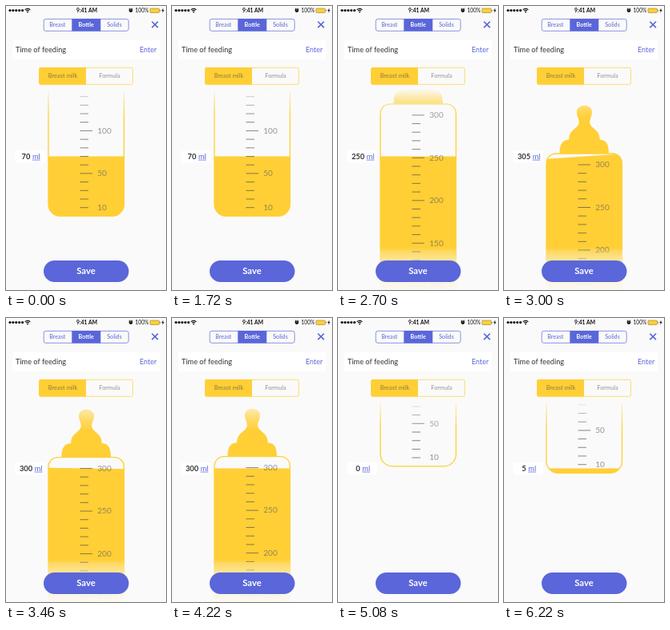
These frames come from a looping animation (200x356 px, 6.26 s). An HTML page with a canvas:

```html
<!DOCTYPE html>
<html lang="en">
<head>
<meta charset="utf-8">
<title>Feeding tracker</title>
<style>
html, body { margin: 0; width: 100%; height: 100%; overflow: hidden; background: #fafafa; }
canvas { display: block; width: 200px; height: 356px; }
</style>
</head>
<body>
<canvas id="stage"></canvas>
<script>
const W = 200, H = 356, LOOP = 6260;
const BLUE = '#5a66d9', YELLOW = '#ffcf35', BG = '#fafafa', INK = '#333338';
const LEVEL = 188.5, PX_PER_ML = 1.07, BODY = 335;
const LEFT = 53, RIGHT = 147.5;
const FAMILY = 'Lato, "Open Sans", sans-serif';

const canvas = document.getElementById('stage');
const ctx = canvas.getContext('2d');
const dpr = window.devicePixelRatio || 1;
canvas.width = W * dpr;
canvas.height = H * dpr;

// Scroll position in ml over time
const keys = [
  [0, 70], [2220, 70], [2420, 139.4], [2800, 285], [3000, 309.8], [3480, 300],
  [4200, 300], [4500, 205], [4780, 80], [4980, 7], [5120, -2.4], [5700, 5.5], [LOOP, 5.5]
];

function slope(i) {
  if (i === 0 || i === keys.length - 1) return 0;
  const [a, b, c] = [keys[i - 1], keys[i], keys[i + 1]];
  if ((b[1] - a[1]) * (c[1] - b[1]) <= 0) return 0;
  return (c[1] - a[1]) / (c[0] - a[0]);
}

function amountAt(t) {
  let i = 0;
  while (i < keys.length - 2 && t >= keys[i + 1][0]) i++;
  const [t0, v0] = keys[i], [t1, v1] = keys[i + 1];
  const d = t1 - t0, u = (t - t0) / d, w = 1 - u;
  return v0 * w * w * (1 + 2 * u) + v1 * u * u * (3 - 2 * u)
    + d * u * w * (slope(i) * w - slope(i + 1) * u);
}

// Damped slosh after the scroll stops
function tiltAt(t) {
  const s = t - 2800;
  if (s < 0 || t > 4200) return 0;
  return 5.6 * Math.exp(-s / 350) * Math.sin(s / 130);
}

function text(str, x, y, size, color, align = 'left', weight = 400) {
  ctx.font = `${weight} ${size}px ${FAMILY}`;
  ctx.textAlign = align;
  ctx.textBaseline = 'alphabetic';
  ctx.fillStyle = color;
  ctx.fillText(str, x, y);
}

function line(x0, y0, x1, y1, color, width) {
  ctx.strokeStyle = color;
  ctx.lineWidth = width;
  ctx.beginPath();
  ctx.moveTo(x0, y0);
  ctx.lineTo(x1, y1);
  ctx.stroke();
}

function box(x, y, w, h, r, fill, stroke) {
  ctx.beginPath();
  ctx.roundRect(x, y, w, h, r);
  if (fill) { ctx.fillStyle = fill; ctx.fill(); }
  if (stroke) { ctx.strokeStyle = stroke; ctx.lineWidth = 0.7; ctx.stroke(); }
}

function dot(x, y, r, color) {
  ctx.fillStyle = color;
  ctx.beginPath();
  ctx.arc(x, y, r, 0, Math.PI * 2);
  ctx.fill();
}

function statusBar() {
  for (let i = 0; i < 5; i++) dot(5 + i * 3.9, 5.5, 1.6, '#111');
  ctx.strokeStyle = '#111';
  ctx.lineWidth = 1.1;
  for (const r of [2.6, 4.6]) {
    ctx.beginPath();
    ctx.arc(27, 8, r, -Math.PI * 0.76, -Math.PI * 0.24);
    ctx.stroke();
  }
  dot(27, 7.6, 0.9, '#111');
  text('9:41 AM', 101, 8, 6.7, '#111', 'center', 700);
  dot(156, 5.6, 2.3, '#111');
  line(153.7, 3.8, 155, 2.7, '#111', 0.9);
  line(158.3, 3.8, 157, 2.7, '#111', 0.9);
  line(156, 4.4, 156, 5.8, '#fff', 0.6);
  text('100%', 178.3, 8, 6.6, '#111', 'right');
  box(180, 3, 11.5, 5.4, 1, YELLOW, '#9c8a4a');
  box(192.3, 4.6, 1, 2.2, 0.4, '#9c8a4a');
  ctx.fillStyle = '#111';
  ctx.beginPath();
  [[196.6, 2.5], [194.4, 6.1], [195.8, 6.1], [195.3, 8.8], [197.7, 5], [196.2, 5]]
    .forEach(([x, y]) => ctx.lineTo(x, y));
  ctx.fill();
}

function header() {
  box(47.2, 16.3, 106, 15, 2.5, BG, BLUE);
  box(82.3, 16, 36, 15.5, 0, BLUE);
  text('Breast', 64.3, 26.1, 7.2, BLUE, 'center');
  text('Bottle', 100.2, 26.1, 7.1, '#fff', 'center', 700);
  text('Solids', 135.5, 26.1, 7.2, BLUE, 'center');
  line(182.4, 19.5, 190, 27.1, BLUE, 1.7);
  line(190, 19.5, 182.4, 27.1, BLUE, 1.7);

  box(8, 43, 184, 24, 0, '#fff');
  text('Time of feeding', 12, 57.5, 9.2, INK);
  text('Enter', 188.3, 57.5, 9, BLUE, 'right');

  box(41.5, 77.3, 117, 21, 2, BG, YELLOW);
  box(41.2, 77, 58.8, 21.6, [2, 0, 0, 2], YELLOW);
  text('Breast milk', 71, 90, 7.5, '#8f7a3f', 'center');
  text('Formula', 129.5, 90, 7.4, '#939095', 'center');
}

function nipple(top) {
  const y = d => top + d;
  ctx.fillStyle = YELLOW;
  ctx.beginPath();
  ctx.moveTo(91, y(-52));
  ctx.bezierCurveTo(91, y(-62.5), 110, y(-62.5), 110, y(-52));
  ctx.bezierCurveTo(110, y(-46), 106.8, y(-44), 107.3, y(-38));
  ctx.bezierCurveTo(109, y(-31), 119.8, y(-30), 119.8, y(-17.5));
  ctx.bezierCurveTo(128, y(-17), 131, y(-12), 131, y(0));
  ctx.lineTo(69.5, y(0));
  ctx.bezierCurveTo(69.5, y(-12), 73, y(-17), 81.2, y(-17.5));
  ctx.bezierCurveTo(81.2, y(-30), 92, y(-31), 93.7, y(-38));
  ctx.bezierCurveTo(94.2, y(-44), 91, y(-46), 91, y(-52));
  ctx.fill();
}

function scale(bottom) {
  for (let ml = 10; ml <= 300; ml += 10) {
    const y = bottom - ml * PX_PER_ML;
    if (y < 95 || y > H + 10) continue;
    const major = ml % 50 === 0;
    line(92.5, y, major ? 108 : 103, y, 'rgba(72,72,82,.66)', 1);
    if (major || ml === 10) text(String(ml), 114.2, y + 3.3, 10.1, 'rgba(86,86,100,.62)');
  }
}

function fade(y0, y1, stops) {
  const g = ctx.createLinearGradient(0, y0, 0, y1);
  for (const [p, a] of stops) g.addColorStop(p, `rgba(250,250,250,${a})`);
  ctx.fillStyle = g;
  ctx.fillRect(45, y0, 110, y1 - y0);
}

function bottle(amount, tilt) {
  const bottom = LEVEL + amount * PX_PER_ML;
  const top = bottom - BODY;
  ctx.save();
  ctx.beginPath();
  ctx.rect(0, 105, W, H - 105);
  ctx.clip();
  nipple(top);

  const body = new Path2D();
  body.roundRect(LEFT, top, RIGHT - LEFT, BODY, [12, 12, 15, 15]);
  ctx.fillStyle = BG;
  ctx.fill(body);
  ctx.save();
  ctx.clip(body);
  ctx.fillStyle = YELLOW;
  ctx.beginPath();
  ctx.moveTo(LEFT, LEVEL + tilt);
  ctx.lineTo(RIGHT, LEVEL - tilt);
  ctx.lineTo(RIGHT, H + 20);
  ctx.lineTo(LEFT, H + 20);
  ctx.fill();
  ctx.restore();
  ctx.strokeStyle = YELLOW;
  ctx.lineWidth = 1.3;
  ctx.stroke(body);

  scale(bottom);
  fade(105, 141, [[0, 0.95], [0.25, 0.62], [0.6, 0.27], [1, 0]]);
  fade(303, H, [[0, 0], [0.08, 0.22], [0.3, 0.5], [0.8, 0.88], [1, 0.97]]);
  ctx.restore();
}

function readout(amount) {
  const ml = Math.min(305, Math.max(0, Math.round(amount / 5) * 5));
  const num = String(ml), size = 9.3, gap = 2.6, y = 191.5;
  box(11.5, 181, 37.5, 15.5, 2, '#fff');
  ctx.font = `700 ${size}px ${FAMILY}`;
  const numW = ctx.measureText(num).width;
  ctx.font = `400 ${size}px ${FAMILY}`;
  const unitW = ctx.measureText('ml').width;
  const x = 31.2 - (numW + gap + unitW) / 2, ux = x + numW + gap;
  text(num, x, y, size, INK, 'left', 700);
  text('ml', ux, y, size, BLUE);
  line(ux, y + 1.6, ux + unitW, y + 1.6, BLUE, 0.7);
}

function draw(t) {
  ctx.setTransform(dpr, 0, 0, dpr, 0, 0);
  ctx.fillStyle = BG;
  ctx.fillRect(0, 0, W, H);
  const amount = amountAt(t);
  statusBar();
  header();
  bottle(amount, tiltAt(t));
  readout(amount);
  box(47, 319, 106.5, 27, 13.5, BLUE);
  text('Save', 100, 335.6, 11.3, '#fff', 'center', 700);
}

const start = performance.now();
function tick() {
  draw((performance.now() - start) % LOOP);
  requestAnimationFrame(tick);
}
tick();
</script>
</body>
</html>
```
